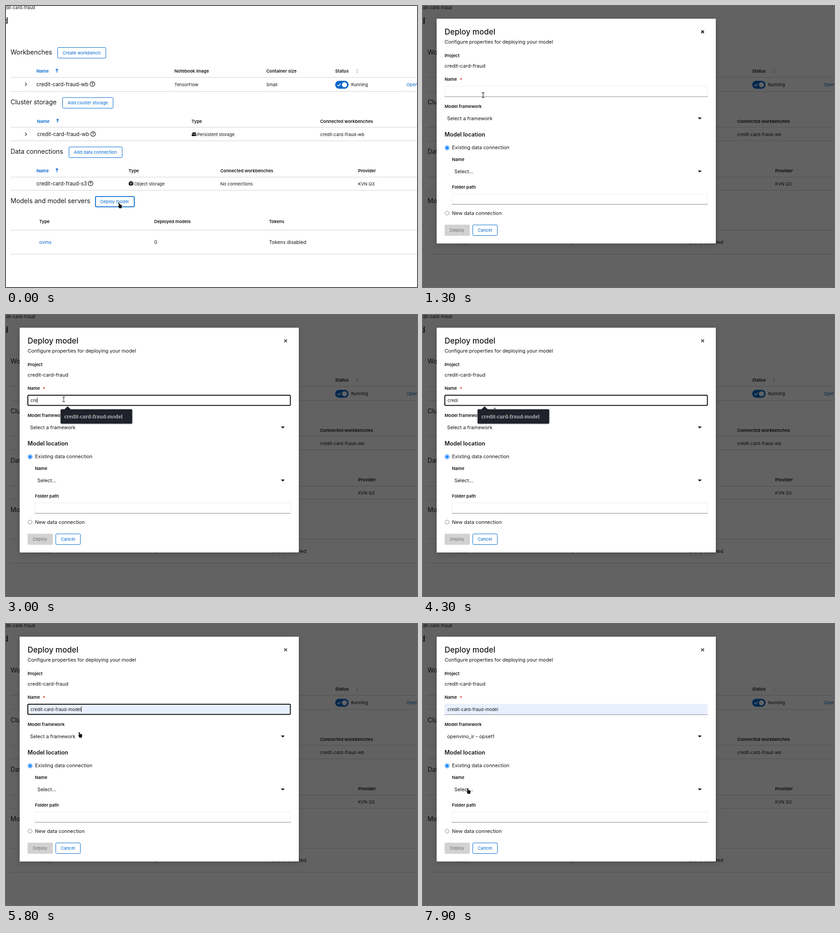
Recreate the animation shown at these times as an HTML page. Size 904x620 px, loop 8 s.

```html
<!DOCTYPE html>
<html lang="en">
<head>
<meta charset="utf-8">
<title>Deploy model</title>
<style>
html, body { margin: 0; width: 100%; height: 100%; overflow: hidden; background: #fff }
svg { display: block; width: 904px; height: 620px; font-family: Inter, sans-serif; fill: #151515 }
.link { fill: #06c }
.serif { font-family: "Noto Serif", serif; fill: #eee }
.arial { font-family: "Liberation Sans", Arial, sans-serif }
</style>
</head>
<body>
<svg id="stage" viewBox="0 0 904 620"><g id="page"></g><g id="dialog"></g><g id="live"></g></svg>
<script>
const $ = id => document.getElementById(id);
const S = 9.6, M = 10.9;

const text = (x, y, s, size = S, attrs = '') => `<text x="${x}" y="${y}" font-size="${size}" ${attrs}>${s}</text>`;
const bold = (x, y, s, attrs = '') => text(x, y, s, S, `font-weight="600" ${attrs}`);
const link = (x, y, s, size = S) => text(x, y, s, size, 'class="link"');
const rect = (x, y, w, h, fill, attrs = '') => `<rect x="${x}" y="${y}" width="${w}" height="${h}" fill="${fill}" ${attrs}/>`;
const path = (d, attrs = '') => `<path d="${d}" ${attrs}/>`;
const stroke = (d, color, w = 1.3) => path(d, `fill="none" stroke="${color}" stroke-width="${w}"`);
const rule = y => rect(10, y, 894, 1, '#d2d2d2');
const button = (x, y, w, tx, s, line = 1) =>
  rect(x + line / 2, y + line / 2, w - line, 24.5 - line, '#fff', `rx="2" stroke="#06c" stroke-width="${line}"`) +
  link(tx, y + 15.7, s);
const sortName = (x, y) => bold(x, y, 'Name', 'class="link"') +
  stroke(`M${x + 45} ${y}v-8m-2.5 2.7l2.5-2.7l2.5 2.7`, '#06c', 1.4);
const chevron = y => stroke(`M42 ${y - 3.5}l3.4 3.5l-3.4 3.5`, '#3c3f42', 1.4);
const help = (x, y) => `<circle cx="${x}" cy="${y}" r="5.2" fill="none" stroke="#151515" stroke-width="1.2"/>` +
  text(x, y + 2.9, '?', 8, 'font-weight="700" text-anchor="middle"');
const caretDown = y => path(`M604.5 ${y - 2}h8.5l-4.2 4.3z`);
const field = (x, y, fill, line) => {
  const w = 626 - x;
  return rect(x + .5, y + .5, w - 1, 23.5, fill, 'stroke="#ececec"') + rect(x, y + 23, w, 1, line);
};

$('page').innerHTML = rect(0, 0, 904, 620, '#fff') +
  text(64, 6.5, 'credit-card-fraud', S, 'text-anchor="end"') +
  text(5, 38.5, 'credit-card-fraud', 18, 'text-anchor="end" font-weight="500"') +

  text(10, 107, 'Workbenches', 14) + button(113, 91, 107, 124.5, 'Create workbench') +
  sortName(67, 147) + bold(370.5, 147, 'Notebook image') + bold(572.5, 147, 'Container size') + bold(724, 147, 'Status') +
  stroke('M772.5 139.5v8m-2-2l2 2l2-2m-4-4l2-2l2 2', '#bbb', 1) +
  rule(157) + chevron(172.7) + text(67, 176.5, 'credit-card-fraud-wb', 11.3) + help(190, 172) +
  text(370.5, 176.5, 'TensorFlow') + text(572.5, 176.5, 'Small') +
  rect(724, 165, 29.5, 17.5, '#06c', 'rx="8.7"') + '<circle cx="744.5" cy="173.8" r="5.6" fill="#fff"/>' +
  stroke('M729 174l2.5 2.5l4.5-4.8', '#fff', 1.7) +
  text(759, 176.5, 'Running') + link(881, 176.5, 'Open') + rule(188) +

  text(10, 217, 'Cluster storage', 14) + button(124, 201.5, 112, 135.5, 'Add cluster storage') +
  sortName(68.5, 257.5) + bold(408, 257.5, 'Type') + bold(691, 257.5, 'Connected workbenches') +
  rule(267) + chevron(283) + text(68.5, 286.8, 'credit-card-fraud-wb', 11.3) + help(191.5, 282.3) +
  path('M410.5 279h6.5l1.8 3.3h-10.2z') + rect(408.5, 283, 10.5, 4, '#151515', 'rx="1"') + rect(415, 284.5, 2.5, 1, '#fff') +
  text(420.5, 286.5, 'Persistent storage') + text(691, 286.5, 'credit-card-fraud-wb') + rule(297) +

  text(10, 326, 'Data connections', 14) + button(138, 310.5, 118, 149.5, 'Add data connection') +
  sortName(67, 366.5) + bold(269.5, 366.5, 'Type') + bold(471.5, 366.5, 'Connected workbenches') + bold(774.5, 366.5, 'Provider') +
  rule(377) + text(67, 395.8, 'credit-card-fraud-s3', 11.3) + help(186, 391.5) +
  path('M275 386.5l5 2v6l-5 2.7l-5-2.7v-6z') + stroke('M270.5 389.3l4.5 1.8l4.5-1.8M275 391v5.5', '#fff', .8) +
  text(282, 395.5, 'Object storage') + text(471.5, 395.5, 'No connections') + text(774.5, 395.5, 'KVN Q3') + rule(406) +

  text(10, 435, 'Models and model servers', 14) + button(196, 419.5, 87, 207.5, 'Deploy model', 1.8) +
  bold(73, 478.5, 'Type') + bold(326, 478.5, 'Deployed models') + bold(578.5, 478.5, 'Tokens') +
  rule(494) + link(73, 525, 'ovms', 10.7) + text(326, 525, '0', 10.7) + text(578.5, 525, 'Tokens disabled', 10.7) + rule(547);

$('dialog').innerHTML = rect(0, 0, 904, 620, '#030303', 'opacity=".62"') +
  rect(30, 28, 614, 496, '#fff', 'style="filter:drop-shadow(0 3px 6px rgba(3,3,3,.2))"') +
  text(47.5, 63, 'Deploy model', 17, 'font-weight="500"') +
  text(47.5, 83.3, 'Configure properties for deploying your model', M) +
  bold(47.5, 112.7, 'Project') + text(47.5, 136, 'credit-card-fraud', M) +
  bold(47.5, 165.3, 'Name') + text(81, 166, '*', S, 'fill="#c9190b" font-weight="600"') +
  bold(47.5, 224.5, 'Model framework') + caretDown(248) +
  text(47.5, 288, 'Model location', 12.5, 'font-weight="600"') +
  '<circle cx="53" cy="313" r="4.3" fill="#fff" stroke="#0075ff" stroke-width="1.2"/><circle cx="53" cy="313" r="2.7" fill="#0075ff"/>' +
  text(63.8, 316, 'Existing data connection', M) +
  bold(63.8, 341.7, 'Name') + text(69, 369.3, 'Select...', M) + caretDown(365) +
  bold(63.8, 403, 'Folder path') +
  '<circle cx="53" cy="457" r="4.3" fill="#fff" stroke="#767676" stroke-width=".9"/>' +
  text(63.8, 461, 'New data connection', M) +
  rect(47.5, 482.5, 55.5, 24.5, '#d2d2d2', 'rx="2"') + text(59, 498, 'Deploy', S, 'fill="#6a6e73"') +
  button(109, 482.5, 55, 120.5, 'Cancel');

const within = (t, ...spans) => spans.some(([a, b]) => t >= a && t < b);
const model = 'credit-card-fraud-model';
const names = ['fraud', model, 'fraud-1', 'fraud-2', 'dense_input'];
const typing = [[2800, 2], [3000, 3], [3300, 4], [3500, 5], [4500, 23]];

// Pointer stops: time, x, y; it glides between them
const stops = [[0, 248.5, 434], [600, 248.5, 434], [1400, 127, 186], [4200, 127, 186], [4300, 158, 211],
  [4800, 178, 232], [5000, 177, 230], [5700, 177, 230], [5800, 161, 238.5], [6000, 152, 246], [6200, 152, 246],
  [6700, 137.5, 281], [7400, 137.5, 281], [7900, 98, 362.5], [8000, 98, 362.5]];

function pointerAt(t) {
  const i = stops.findIndex(s => s[0] > t);
  const [t0, x0, y0] = stops[i - 1], [t1, x1, y1] = stops[i];
  const p = (t - t0) / (t1 - t0), e = p * p * (3 - 2 * p);
  return [x0 + (x1 - x0) * e, y0 + (y1 - y0) * e];
}

function pointer(t, menu) {
  const [x, y] = pointerAt(t);
  const at = `transform="translate(${x} ${y})"`;
  const edge = `stroke="#fff" stroke-width="1" paint-order="stroke" ${at}`;
  if (t >= 300 && (within(y, [172, 214], [414, 440])))
    return path('M-3-5.5q2.5 0 3 1q.5-1 3-1M0-4.5v9M-3 5.5q2.5 0 3-1q.5 1 3 1', `fill="none" stroke="#222" stroke-width="1.1" ${at}`);
  if (t < 300 || within(y, [236, 262], [352, 379]) || menu)
    return path('M-1.6 1q.8-1.6 2.2-.3l1.4 3.2q3.6 0 4.4 1.8v3.3q-.4 1.4-.9 3.2h-5.2q-.9-2.6-2.5-4.6q.2-1.6 2.2-.8z', edge);
  return path('M0 0v9.6l2.3-2l1.6 3.7l1.8-.8l-1.6-3.6h3.1z', edge);
}

function popup(t, picked) {
  const list = t < 2800 ? names : [model];
  const h = 5.5 + 26.3 * list.length;
  return path('M128 208.5l7.5-7l7.5 7z', 'fill="#20222b"') +
    rect(120, 208, 157.7, h, '#20222b', 'rx="2" style="filter:drop-shadow(0 1px 1px rgba(0,0,0,.3))"') +
    (picked ? rect(120, 211, 157.7, 26.3, '#2a7bff') : '') +
    list.map((s, i) => text(128.3, 228 + 26.3 * i, s, 11.2, 'class="serif"')).join('');
}

const options = () =>
  rect(47.5, 261, 579, 66, '#fff', 'style="filter:drop-shadow(0 3px 4px rgba(3,3,3,.2))"') +
  rect(47.5, 266.5, 579, 27.3, '#f0f0f0') +
  text(58.5, 284, 'openvino_ir - opset1', M) + text(58.5, 311.5, 'onnx - 1', M);

function form(t, menu) {
  const focus = within(t, [1500, 6100]);
  const picked = within(t, [4500, 5300]);
  const fill = t >= 4500 ? '#e8f0fe' : '#fff';
  const count = typing.reduce((n, [at, k]) => t >= at ? k : n, 0);
  const gray = '#8a8d90';
  return stroke('M612 54l6 6m0-6l-6 6', t < 1500 ? '#151515' : '#4f5255', 1.9) +
    (focus ? rect(48, 177, 577.5, 22.5, fill, 'rx="2" stroke="#101010" stroke-width="2"') : field(47.5, 176.5, fill, gray)) +
    `<g id="value">${text(54, 191.5, model.slice(0, count), picked ? 9.7 : S, picked ? 'class="arial"' : '')}</g>` +
    text(53, 252, t < 7000 ? 'Select a framework' : 'openvino_ir - opset1', M) +
    field(63.5, 414, '#fff', t < 800 ? '#3c3f42' : gray) +
    (within(t, [1500, 5300]) ? popup(t, picked) : '') +
    (menu ? options() : '');
}

function draw(t) {
  const menu = within(t, [6100, 7000]);
  $('dialog').style.display = t < 300 ? 'none' : '';
  $('live').innerHTML = (t < 300 ? '' : form(t, menu)) + pointer(t, menu);
  if (within(t, [1500, 2100], [2800, 4100], [5400, 6100])) {
    const w = $('value').firstChild.getComputedTextLength();
    $('value').innerHTML += rect(54 + w, 182, .9, 12.5, '#151515');
  }
}

// The screen updates ten times a second
let last = -1;
function tick(now) {
  const t = Math.floor(now % 8000 / 100) * 100;
  if (t !== last) draw(last = t);
  requestAnimationFrame(tick);
}
draw(0);
requestAnimationFrame(tick);
</script>
</body>
</html>
```
